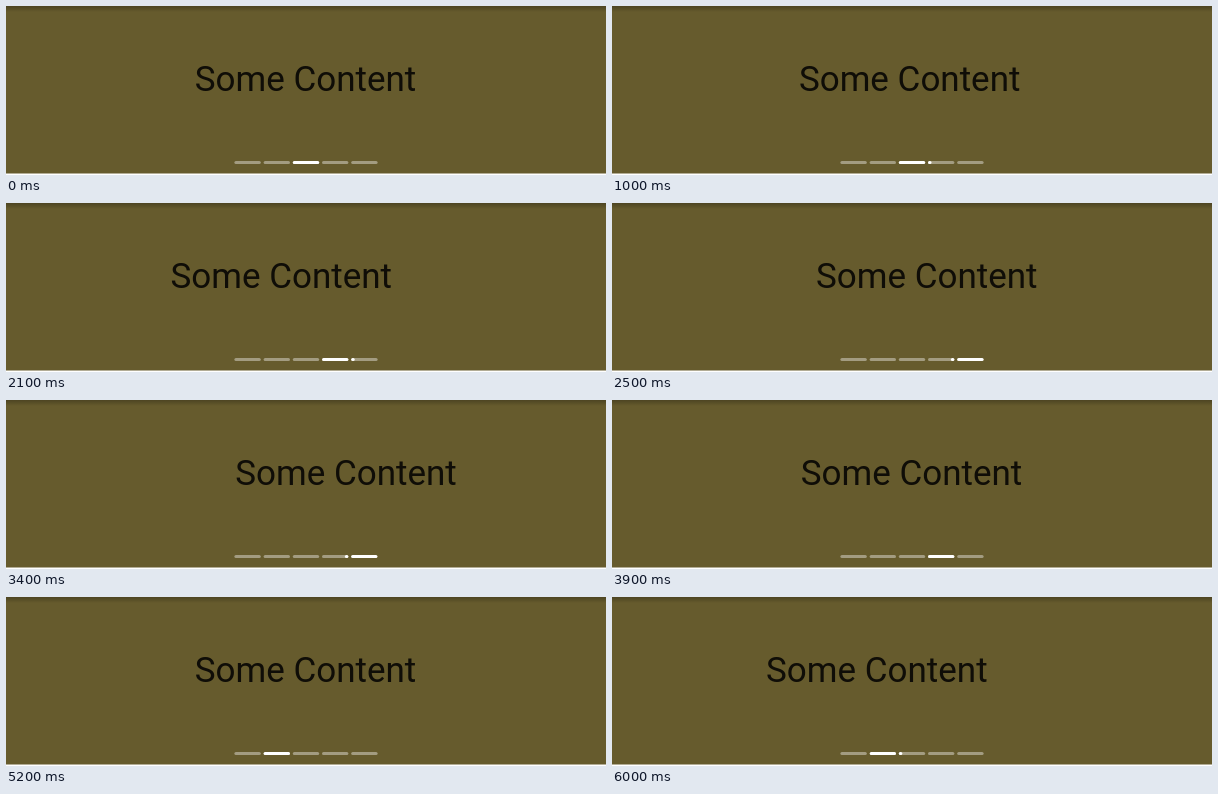
An HTML page with a canvas for the animation above (6100 ms loop, 600 by 169 pixels).

```html
<!DOCTYPE html>
<html lang="en">
<head>
<meta charset="utf-8">
<title>Pager indicator</title>
<style>
  html, body { margin: 0; width: 100%; height: 100%; overflow: hidden; background: #fff; }
  canvas { display: block; }
</style>
</head>
<body>
<canvas width="600" height="169"></canvas>
<script>
const ctx = document.querySelector('canvas').getContext('2d');
const W = 600, H = 169, LOOP = 6100, STEP = 100, PAGES = 5;
const BAR = { x: 228.4, y: 155, w: 26.4, h: 3, pitch: 29.2, dot: 3.5 };
const SLOW = 686, FAST = 520;

const swipes = [
  { begin: 976, span: SLOW, dir: 1 },
  { begin: 2033, span: FAST, dir: 1 },
  { begin: 3313, span: FAST, dir: -1 },
  { begin: 3960, span: FAST, dir: -1 },
  { begin: 4595, span: FAST, dir: -1 },
  { begin: 5894, span: SLOW, dir: 1 },
];

const ease = u => (1 - Math.cos(Math.PI * Math.min(1, Math.max(0, u)))) / 2;

// The picture advances ten times a second
function position(time) {
  const t = Math.floor(time / STEP) * STEP;
  return swipes.reduce((page, s) => page + s.dir * ease((t - s.begin) / s.span), 2);
}

function bar(x, w, color) {
  ctx.fillStyle = color;
  ctx.beginPath();
  ctx.roundRect(x, BAR.y, w, BAR.h, BAR.h / 2);
  ctx.fill();
}

function draw(page) {
  ctx.fillStyle = '#fff';
  ctx.fillRect(0, 0, W, H);
  ctx.fillStyle = '#665b2d';
  ctx.fillRect(0, 0, W, 167.5);
  const shade = ctx.createLinearGradient(0, 0, 0, 6);
  shade.addColorStop(0, 'rgba(0,0,0,.25)');
  shade.addColorStop(1, 'rgba(0,0,0,0)');
  ctx.fillStyle = shade;
  ctx.fillRect(0, 0, W, 6);

  ctx.font = '35px Roboto, sans-serif';
  ctx.textAlign = 'center';
  ctx.fillStyle = '#0f0d07';
  for (let i = 0; i < PAGES; i++) {
    ctx.fillText('Some Content', 299.5 + (i - page) * W, 85);
  }

  const barX = i => BAR.x + i * BAR.pitch;
  for (let i = 0; i < PAGES; i++) bar(barX(i), BAR.w, 'rgba(255,255,255,.4)');

  // The highlight drains from one bar while it fills the next
  const first = Math.floor(page + 1e-6);
  const part = Math.max(0, page - first);
  const fill = ease(part);
  const left = Math.max(BAR.dot, BAR.w * (1 - fill));
  bar(barX(first) + BAR.w - left, left, '#fff');
  if (part > 1e-6) bar(barX(first + 1), Math.max(BAR.dot, BAR.w * fill), '#fff');
}

const t0 = performance.now();
function frame() {
  draw(position((performance.now() - t0) % LOOP));
  requestAnimationFrame(frame);
}
frame();
</script>
</body>
</html>
```
